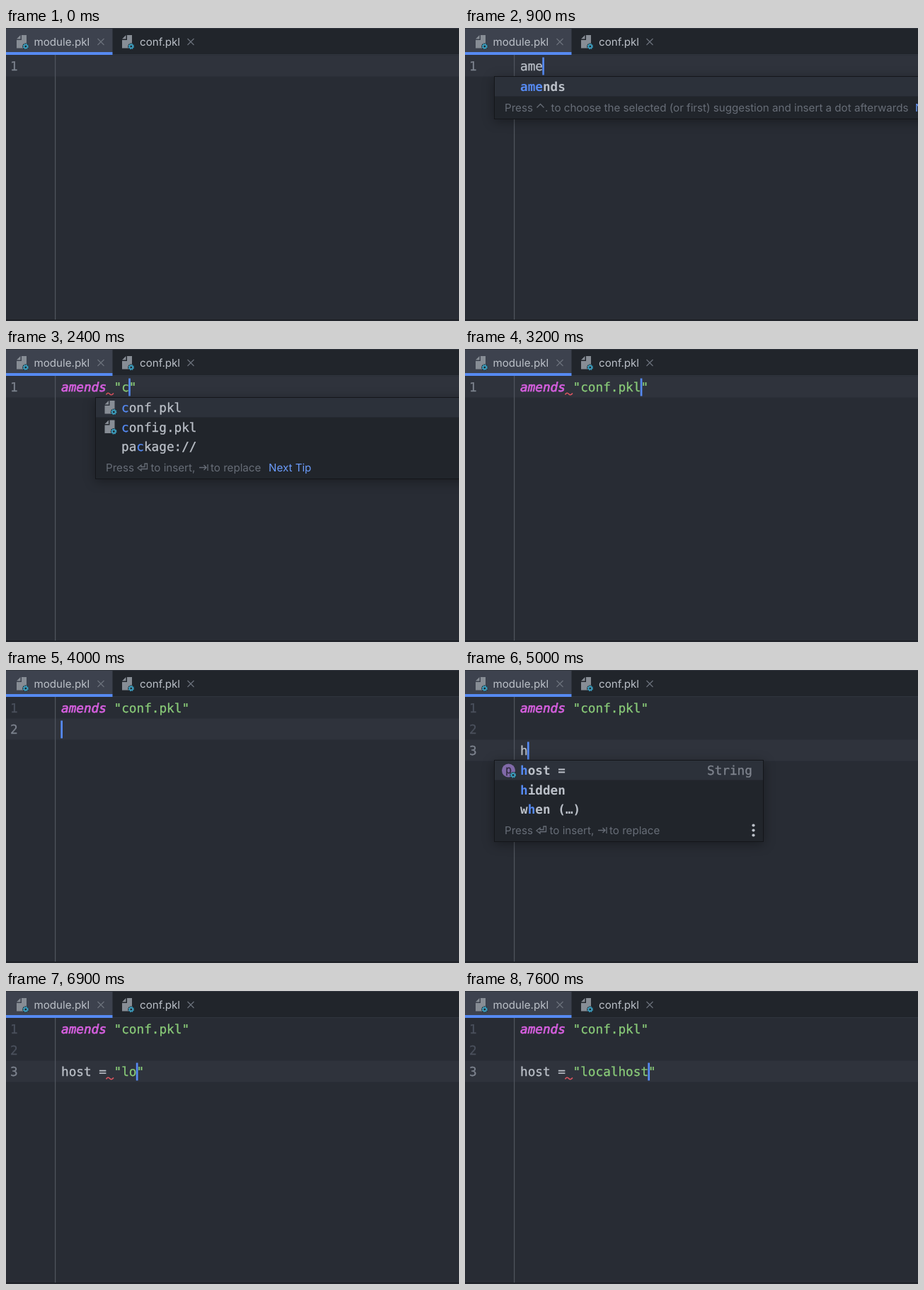
Animation, 640 px wide and 414 px high, one loop 8000 ms. Source, as an HTML page:

```html
<!DOCTYPE html>
<html lang="en">
<head>
<meta charset="utf-8">
<title>Editor completion</title>
<style>
  html, body { margin: 0; width: 100%; height: 100%; overflow: hidden; background: #282c34; }
  svg { display: block; width: 640px; height: 414px; }
  text { white-space: pre; text-rendering: geometricPrecision; color: #bbc0c8; fill: currentColor; }
  tspan { fill: currentColor; stroke: currentColor; }
  .ui { font: 15.15px Inter, sans-serif; }
  .code { font: 17.7px "DejaVu Sans Mono", monospace; stroke: currentColor; stroke-width: .3; }
  .bold { font-weight: bold; stroke-width: 0; }
  .key { color: #d55fde; font-style: italic; stroke-width: .7; }
  .str { color: #89ca78; }
  .hit { color: #568af2; }
  .num { color: #4b515d; }
  .num.on { color: #7d838e; }
  .type { color: #7f848e; }
  .tip { color: #676d77; }
  .link { color: #6b9bfa; }
  .line { fill: none; stroke: #676d77; stroke-width: 1.3; }
  .menu { filter: drop-shadow(0 3px 8px rgba(0, 0, 0, .35)); }
</style>
</head>
<body>
<svg viewBox="0 0 640 414">
  <defs>
    <g id="gear">
      <circle r="4.6" fill="#23272e"/>
      <circle r="2.3" fill="none" stroke="#3c9dbd" stroke-width="1.8"/>
      <circle r="3.5" fill="none" stroke="#3c9dbd" stroke-width="1.4" stroke-dasharray="1.5 1.25"/>
    </g>
    <g id="file">
      <path d="M7 0H14V18.5H0V7H7ZM5.5 0V5.5H0Z" fill="#878d95"/>
      <use href="#gear" x="12.8" y="16"/>
    </g>
    <path id="close" d="M-4.5-4.5L4.5 4.5M4.5-4.5L-4.5 4.5" stroke="#6c727c" stroke-width="1.2"/>
  </defs>

  <rect width="640" height="414" fill="#282c34"/>
  <g id="page"></g>

  <rect width="640" height="38" fill="#21252b"/>
  <path d="M0 .5H640M0 37.5H640" stroke="#30353d"/>
  <rect y="1" width="150.5" height="33" fill="#3d424e"/>
  <rect y="34" width="150.5" height="4" fill="#568af2"/>
  <use href="#file" x="15" y="10"/>
  <text class="ui" x="39.5" y="25">module.pkl</text>
  <use href="#close" x="134" y="19.5"/>
  <use href="#file" x="164" y="10"/>
  <text class="ui" x="189" y="25">conf.pkl</text>
  <use href="#close" x="261" y="19.5"/>
  <path d="M0 412.5H640" stroke="#191b20"/>
  <g id="popup"></g>
</svg>

<script>
const CHAR = 10.65, LEFT = 78, ROW = 30, ITEM = 27.5, LOOP = 8000;
const page = document.getElementById('page');
const popup = document.getElementById('popup');

const keywords = (q, ...items) => ({ x: 41.5, y: 68.5, w: 640, q, items, bold: true, dot: true });
const files = (q, ...items) => ({ x: 126.5, y: 68.5, w: 640, q, items });
const props = (q, ...items) => ({ x: 41.5, y: 127.5, w: 380, q, items, bold: true, prop: true });

const conf = ['conf.pkl', 'config.pkl'];
const head = 'amends "conf.pkl"\n';
const host = head + '\nhost = ';

// Each step changes part of the state; "|" marks the caret.
const steps = [
  [0, { code: '', err: -1, menu: null }],
  [100, { code: '|' }],
  [500, { code: 'a|' }],
  [600, { menu: keywords('a', 'abstract', 'amends', 'class', 'external', 'local', 'typealias') }],
  [700, { code: 'am|' }],
  [800, { menu: keywords('am', 'amends') }],
  [900, { code: 'ame|', menu: keywords('ame', 'amends') }],
  [1500, { code: 'amends |', menu: null }],
  [1900, { err: 0 }],
  [2300, { code: 'amends "|"' }],
  [2400, { code: 'amends "c|"', menu: files('c', ...conf, 'package://') }],
  [2500, { code: 'amends "co|"' }],
  [2600, { menu: files('co', ...conf) }],
  [2700, { code: 'amends "con|"', menu: files('con', ...conf) }],
  [2900, { code: 'amends "conf|"', menu: files('conf', ...conf) }],
  [3200, { code: 'amends "conf.pkl|"', menu: null }],
  [3600, { code: 'amends "conf.pkl"|', err: -1 }],
  [4000, { code: head + '|' }],
  [4100, { code: head + '\n|' }],
  [4500, { code: head + '\nh|' }],
  [4700, { menu: props('h', 'host =', 'hidden', 'when (…)') }],
  [5600, { code: head + '\nh' }],
  [5900, { code: host + '|', menu: null }],
  [6200, { err: 2 }],
  [6500, { code: host + '"|"' }],
  ...[[6800, 'l'], [6900, 'lo'], [7000, 'loca'], [7100, 'local'],
      [7400, 'localh'], [7500, 'localhos'], [7600, 'localhost']]
    .map(([t, word]) => [t, { code: `${host}"${word}|"` }])
];

const rect = (x, y, w, h, fill, more = '') =>
  `<rect x="${x}" y="${y}" width="${w}" height="${h}" fill="${fill}" ${more}/>`;
const text = (x, y, cls, s) => `<text x="${x}" y="${y}" class="${cls}">${s}</text>`;
const span = cls => s => `<tspan class="${cls}">${s}</tspan>`;

function drawPage({ code, err }) {
  const lines = code.split('\n'), last = lines.length - 1;
  let out = rect(0, 38.5 + last * ROW, 640, ROW, '#2f333c') + rect(69, 38, 1.2, 374, '#50555e');
  lines.forEach((line, i) => {
    const y = 60 + i * ROW, caret = line.indexOf('|');
    const styled = line.replace('|', '')
      .replace(/".*"/, span('str'))
      .replace(/^amends(?= )/, span('key'));
    out += text(6, y, i == last ? 'code num on' : 'code num', i + 1) + text(LEFT, y, 'code', styled);
    if (i == err)
      out += `<path d="M141.5 ${y + 4.5}q2.5-4 5-1t5.5-1" fill="none" stroke="#e05561" stroke-width="1.5"/>`;
    if (caret >= 0) out += rect(LEFT + caret * CHAR - .7, y - 18.5, 2.7, 25, '#568af2');
  });
  return out;
}

function drawTip({ x, w, dot, prop }, y) {
  const put = (dx, s, cls = 'tip') => text(x + dx, y, 'ui ' + cls, s);
  const icon = d => `<path class="line" transform="translate(${x} ${y})" d="${d}"/>`;
  let out = put(14.5, 'Press');
  if (dot)
    return out + icon('M60-5l5-5 5 5') + put(594.5, 'Next Tip', 'link') +
      put(71.5, '. to choose the selected (or first) suggestion and insert a dot afterwards');
  out += icon('M59.5-4.5l5-4v2.5h5v-4.5h3.5v7.5h-8.5v2.5z') + put(78, 'to insert,') +
    icon('M146.5-5H156.5M153-8.5l3.5 3.5-3.5 3.5M158.5-9.5V-.5') + put(162.5, 'to replace');
  if (!prop) return out + put(244.5, 'Next Tip', 'link');
  for (const dy of [-12, -5, 2])
    out += `<circle cx="${x + w - 14}" cy="${y + dy}" r="2.1" fill="#bbc0c8"/>`;
  return out;
}

function drawMenu(m) {
  if (!m) return '';
  const { x, y, w, q, items, bold, prop } = m;
  const h = 32.5 + ITEM * items.length;
  let out = rect(x, y, w, h, '#21252b', 'class="menu" stroke="#14161a"') +
    rect(x + .5, y + .5, w - 1, ITEM, '#2c313a');
  items.forEach((item, i) => {
    const base = y + 20.5 + i * ITEM;
    out += text(x + 36.5, base, bold ? 'code bold' : 'code', item.replace(q, span('hit')));
    if (item.endsWith('.pkl')) out += `<use href="#file" x="${x + 13}" y="${base - 16}"/>`;
  });
  if (prop)
    out += `<circle cx="${x + 20}" cy="${y + 14.5}" r="9.5" fill="#8069a8"/>` +
      `<text x="${x + 15.5}" y="${y + 18.5}" class="code" style="font-size:15px;color:#30293f">p</text>` +
      `<use href="#gear" x="${x + 26.5}" y="${y + 21}"/>` +
      text(x + 300.5, y + 20.5, 'code type', 'String');
  return out + drawTip(m, y + 21.5 + ITEM * items.length);
}

let shown = 0;
function frame(now) {
  const t = now % LOOP;
  const count = steps.filter(([at]) => at <= t).length;
  if (count != shown) {
    shown = count;
    const state = Object.assign({}, ...steps.slice(0, count).map(s => s[1]));
    page.innerHTML = drawPage(state);
    popup.innerHTML = drawMenu(state.menu);
  }
  requestAnimationFrame(frame);
}
frame(0);
</script>
</body>
</html>
```
